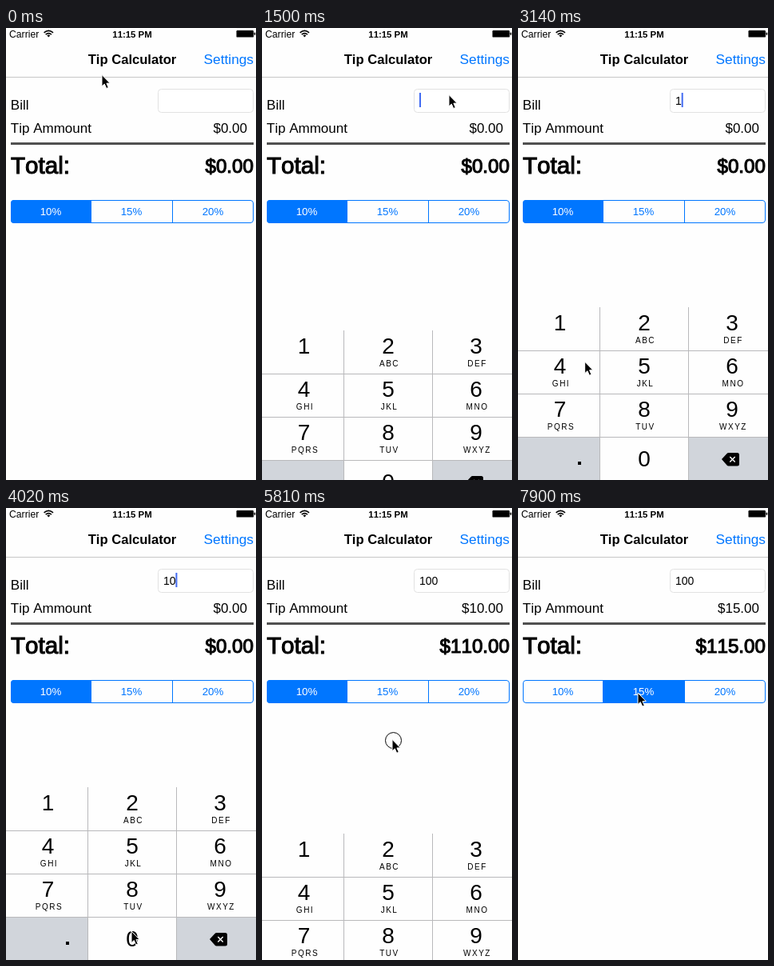
Recreate the animation shown at these times as an HTML page. Size 313x565 px, loop 8000 ms.

```html
<!DOCTYPE html>
<html lang="en">
<head>
<meta charset="utf-8">
<title>Tip Calculator</title>
<style>
  html, body { margin: 0; width: 100%; height: 100%; overflow: hidden; background: #fefefe; }
  svg {
    display: block; width: 100vw; height: 100vh;
    font-family: "Liberation Sans", Arial, sans-serif; font-kerning: none;
  }
  .mid { text-anchor: middle; }
  .end { text-anchor: end; }
  .body { font-size: 17px; }
  .bold { font-weight: bold; }
  .medium { stroke: #000; stroke-width: 1.1px; }
  .letters { font-size: 10px; letter-spacing: 1.5px; }
</style>
</head>
<body>
<svg id="stage" viewBox="0 0 313 565">
  <text x="4" y="11.5" font-size="12.2">Carrier</text>
  <g fill="none" stroke="#000" stroke-width="1.7">
    <path d="M47.6 5.9Q53.3 .9 59 5.9M49.7 8.2Q53.3 5 56.9 8.2"/>
    <path d="M51.3 9.2L53.3 11.4L55.3 9.2Q53.3 7.6 51.3 9.2Z" fill="#000" stroke="none"/>
  </g>
  <text x="158" y="11.5" font-size="11.4" class="mid bold">11:15 PM</text>
  <rect x="288.5" y="3" width="21.5" height="8.6" rx="1.2"/>
  <rect x="310.6" y="5.5" width="1.6" height="3.6" rx=".8"/>

  <text x="158" y="45" font-size="16.6" class="mid bold">Tip Calculator</text>
  <text x="310" y="45" font-size="17.3" class="end" fill="#0076ff">Settings</text>
  <path d="M0 61.5H313" stroke="#c8c8c8"/>

  <text x="5.8" y="102" class="body">Bill</text>
  <rect x="190.5" y="76.5" width="119" height="29" rx="4" fill="#fff" stroke="#e2e2e2"/>
  <text id="bill" x="197" y="95.7" font-size="14"></text>
  <rect id="caret" y="81" width="2" height="18" fill="#426bf2"/>
  <text x="5.8" y="130.5" class="body">Tip Ammount</text>
  <text id="tip" x="302" y="130.5" class="body end"></text>
  <rect x="6" y="143" width="304" height="3" fill="#505050"/>
  <text x="6" y="182" font-size="29.6" class="medium">Total:</text>
  <text id="total" x="310" y="180.5" font-size="24.2" class="medium end"></text>

  <g id="segments" font-size="13.3"></g>
  <rect x="6.5" y="215.5" width="303" height="28" rx="3.5" fill="none" stroke="#0076ff"/>
  <path d="M106.5 215V244M208.5 215V244" stroke="#0076ff"/>
  <clipPath id="rounded"><rect x="6" y="215" width="304" height="29" rx="4"/></clipPath>

  <g id="keyboard"></g>
  <g id="cursor">
    <circle id="click" cx="1.5" cy="1.3" r="10" fill="none" stroke="#000"/>
    <path d="M0 0V14.5L3.3 11.5L5.7 17L8.3 16L5.9 10.6H10.3Z" stroke="#fff" stroke-linejoin="round"/>
  </g>
</svg>
<script>
const STEP = 148.9, LOOP = 8000;
const BLUE = '#0076ff';
const $ = id => document.getElementById(id);

function add(parent, tag, attrs, text = '') {
  const node = document.createElementNS('http://www.w3.org/2000/svg', tag);
  for (const name in attrs) node.setAttribute(name, attrs[name]);
  node.textContent = text;
  return parent.appendChild(node);
}

function buildKeyboard() {
  const board = $('keyboard');
  const columns = [52.5, 158, 268];
  const letters = ['', 'ABC', 'DEF', 'GHI', 'JKL', 'MNO', 'PQRS', 'TUV', 'WXYZ'];
  add(board, 'rect', { y: 349, width: 313, height: 216, fill: '#fefefe' });
  add(board, 'path', { d: 'M0 511H102V565H0ZM214 511H313V565H214Z', fill: '#d1d5db' });
  add(board, 'path', {
    d: 'M102.5 349V565M213.5 349V565M0 403.5H313M0 457.5H313M0 511.5H313', stroke: '#b9b9bb'
  });
  letters.forEach((label, i) => {
    const x = columns[i % 3], top = 349 + 54 * Math.floor(i / 3);
    add(board, 'text', { x, y: top + 29.3, 'font-size': 28, class: 'mid' }, i + 1);
    add(board, 'text', { x: x + 1.5, y: top + 45, class: 'mid letters' }, label);
  });
  add(board, 'text', { x: 158, y: 547.5, 'font-size': 28, class: 'mid' }, '0');
  add(board, 'rect', { x: 75, y: 542, width: 4, height: 4 });
  add(board, 'path', {
    d: 'M255 539L261.5 532Q262.3 531 263.5 531H274.5Q277 531 277 533.5V545Q277 547.5 274.5 547.5H263.5Q262.3 547.5 261.5 546.5Z'
  });
  add(board, 'path', { d: 'M265.3 536L271.7 542.5M271.7 536L265.3 542.5', stroke: '#fff', 'stroke-width': 1.4 });
}

const segments = [[6, 101, 56], [107, 101, 157], [209, 101, 259]].map(([x, width, center], i) => ({
  fill: add($('segments'), 'rect', { x, y: 215, width, height: 29, 'clip-path': 'url(#rounded)' }),
  label: add($('segments'), 'text', { x: center, y: 234, class: 'mid' }, `${10 + 5 * i}%`)
}));

// Cursor stops as [step, x, y]; it eases from one to the next.
const path = [
  [2, 120, 58.5], [7, 234, 83.5], [10, 234, 83.5], [15, 73, 378], [17, 58, 378], [19, 58, 378],
  [25, 157, 529], [30, 157, 529], [36, 163, 289.3], [44, 163, 289.3], [49, 150, 231]
];
const clicks = [9, 19, 26, 29, 39, 51];

function cursorAt(step) {
  const next = path.findIndex(stop => stop[0] >= step);
  if (next < 0) return path.at(-1).slice(1);
  if (next === 0) return path[0].slice(1);
  const [s0, x0, y0] = path[next - 1], [s1, x1, y1] = path[next];
  const u = (step - s0) / (s1 - s0), ease = u * u * (3 - 2 * u);
  return [x0 + (x1 - x0) * ease, y0 + (y1 - y0) * ease];
}

function keyboardOffset(step) {
  if (step < 9) return 220;
  if (step < 39) return [166, 29][step - 9] ?? 0;
  return [58, 190, 214][step - 39] ?? 220;
}

function draw(time) {
  const step = Math.floor((time % LOOP + 1) / STEP);
  const bill = step >= 29 ? '100' : step >= 26 ? '10' : step >= 19 ? '1' : '';
  const selected = step >= 52 ? 1 : 0;
  const amount = step >= 39 ? 100 : 0;
  const tip = amount * (10 + 5 * selected) / 100;
  const lastClick = clicks.findLast(s => s <= step);
  const editing = step >= 9 && step < 39;

  $('bill').textContent = bill;
  $('tip').textContent = '$' + tip.toFixed(2);
  $('total').textContent = '$' + (amount + tip).toFixed(2);
  $('caret').setAttribute('x', 197 + 7.7 * bill.length);
  $('caret').setAttribute('visibility', editing && (step - lastClick) % 7 < 4 ? 'visible' : 'hidden');

  segments.forEach(({ fill, label }, i) => {
    const pressed = step === 51 && i === 1;
    fill.setAttribute('fill', i === selected ? BLUE : pressed ? '#d9ebff' : '#fefefe');
    label.setAttribute('fill', i === selected ? '#fff' : BLUE);
  });

  $('keyboard').setAttribute('transform', `translate(0 ${keyboardOffset(step)})`);
  $('cursor').setAttribute('transform', `translate(${cursorAt(step)})`);
  $('click').setAttribute('visibility', lastClick === step ? 'visible' : 'hidden');
}

buildKeyboard();
const start = performance.now();
function tick() {
  draw(performance.now() - start);
  requestAnimationFrame(tick);
}
tick();
</script>
</body>
</html>
```
